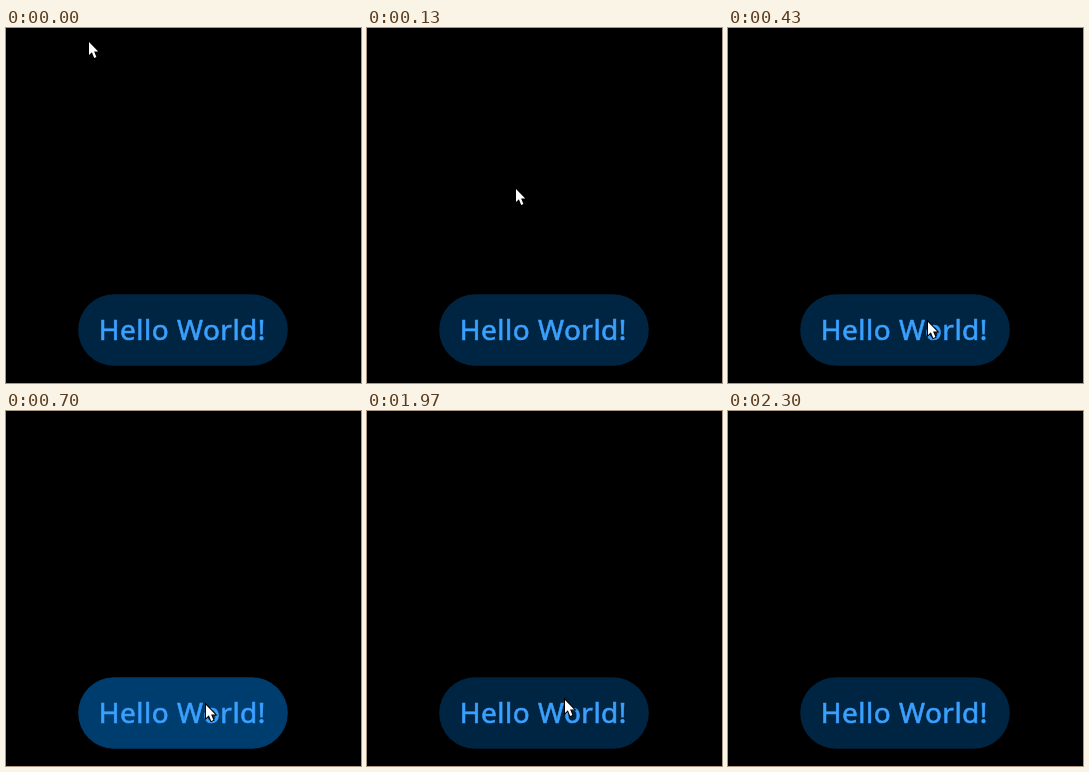
Write an HTML page that moves like this. It is 355 px wide and 355 px high and loops after 2930 ms.

```html
<!DOCTYPE html>
<html lang="en">
<head>
<meta charset="utf-8">
<title>Button press</title>
<style>
  html, body { margin: 0; height: 100%; overflow: hidden; background: #000; }
  svg { display: block; width: 100vw; height: 100vh; }
  text {
    font: 28px "Noto Sans", "Open Sans", sans-serif;
    letter-spacing: .5px;
    fill: #3ba1ff;
    stroke: #3ba1ff;
    stroke-width: .6px;
  }
</style>
</head>
<body>
<svg viewBox="0 0 355 355">
  <rect id="button" x="72.2" y="266.3" width="209.6" height="71.4" rx="35.7" fill="#002542"/>
  <text x="92.7" y="311.6">Hello World!</text>
  <path id="cursor" d="M0 0V13L2.9 10.3L5.2 16L7.4 15L5.1 9.5H9.2Z"
        fill="#fff" stroke="#000" stroke-width="2" paint-order="stroke"/>
</svg>
<script>
  const LOOP = 2930, FPS = 30;
  const START = [83, 14], REST = [200, 294];
  const ARRIVE = 13, PRESS = 21, RELEASE = 39, LEAVE = 58;
  const button = document.getElementById("button");
  const cursor = document.getElementById("cursor");

  function cursorAt(step) {
    if (step < ARRIVE) {
      const left = 1 - step / ARRIVE;
      const ease = [2.26, 2.03];
      return REST.map((end, i) => end + (START[i] - end) * left ** ease[i]);
    }
    const away = (Math.max(0, step - LEAVE) / 10) ** 1.76;
    return [REST[0] - 100 * away, REST[1] - 294 * away];
  }

  function draw(now) {
    const step = Math.floor((now % LOOP + 3.5) * FPS / 1000);
    const [x, y] = cursorAt(step).map(Math.round);
    cursor.setAttribute("transform", `translate(${x} ${y})`);
    button.setAttribute("fill", step >= PRESS && step < RELEASE ? "#003d6f" : "#002542");
  }

  const origin = performance.now();
  function tick() {
    draw(performance.now() - origin);
    requestAnimationFrame(tick);
  }
  tick();
</script>
</body>
</html>
```
